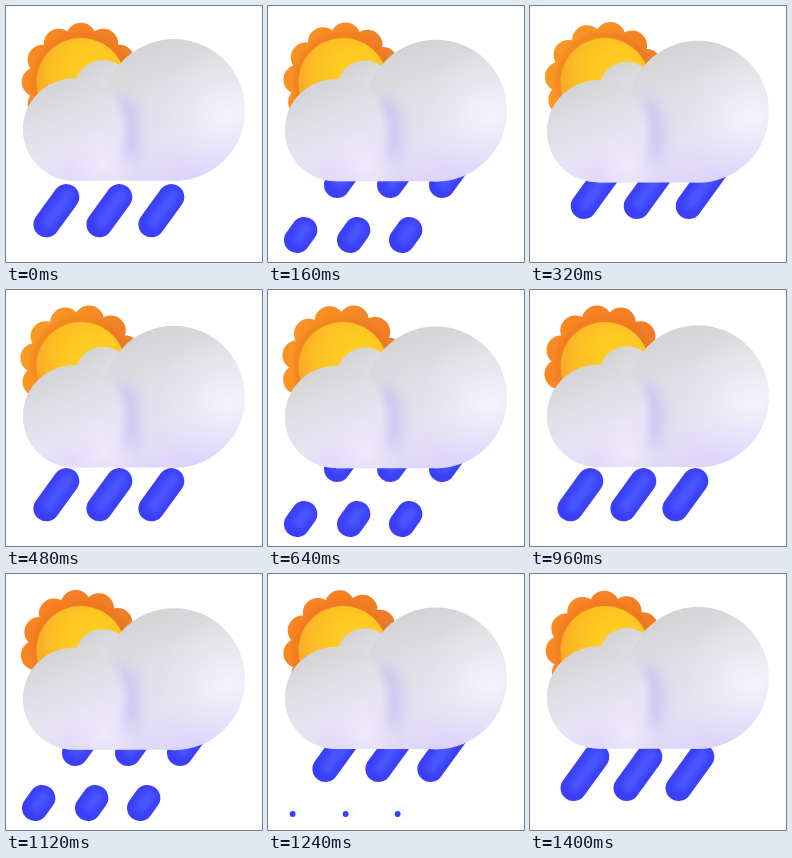
Animation, 256 px wide and 256 px high, one loop 1440 ms. Source, as an HTML page with a canvas:

```html
<!DOCTYPE html>
<html lang="en">
<head>
<meta charset="utf-8">
<title>Sun behind rain cloud</title>
<style>
  html, body { margin: 0; height: 100%; overflow: hidden; background: #fff; }
  canvas { display: block; width: 256px; height: 256px; }
</style>
</head>
<body>
<canvas id="stage" width="256" height="256"></canvas>
<script>
const LOOP = 1440, RAIN = 480, STEP = 40, TAU = Math.PI * 2;
const ctx = document.getElementById('stage').getContext('2d');

// Cosine wave over the loop, highest at the given time
const wave = (t, peak) => Math.cos(TAU * (t - peak) / LOOP);
const clamp = (v, lo, hi) => Math.min(hi, Math.max(lo, v));

function addCircle(path, x, y, r) {
  path.moveTo(x + r, y);
  path.arc(x, y, r, 0, TAU);
}

function disc(x, y, r, fill) {
  ctx.beginPath();
  ctx.arc(x, y, r, 0, TAU);
  ctx.fillStyle = fill;
  ctx.fill();
}

function withStops(gradient, colors) {
  colors.forEach((c, i) => gradient.addColorStop(i / (colors.length - 1), c));
  return gradient;
}
const radial = (x, y, r, ...colors) => withStops(ctx.createRadialGradient(x, y, 0, x, y, r), colors);
const linear = (x0, y0, x1, y1, ...colors) => withStops(ctx.createLinearGradient(x0, y0, x1, y1), colors);

function drawSun(t) {
  const x = 75, y = 76;
  const tip = 60.6 - 1.3 * wave(t, 0), bump = 15;
  const turn = TAU / 12 * t / LOOP;
  const light = 142 + 10 * wave(t, 440);
  const petals = new Path2D();
  addCircle(petals, x, y, 50);
  for (let i = 0; i < 12; i++) {
    const a = turn + i * TAU / 12;
    addCircle(petals, x + (tip - bump) * Math.sin(a), y - (tip - bump) * Math.cos(a), bump);
  }
  ctx.fillStyle = linear(x - 50, y - 10, x + 50, y - 10, `rgb(249,${light},36)`, `rgb(247,${light - 6},36)`, '#ee7d28');
  ctx.fill(petals);
  ctx.save();
  ctx.clip(petals);
  ctx.filter = 'blur(2px)';
  ctx.strokeStyle = 'rgba(226,104,24,.4)';
  ctx.lineWidth = 4;
  ctx.beginPath();
  ctx.arc(x, y, 47, 0, TAU);
  ctx.stroke();
  ctx.restore();
  disc(x, y + .5, 44.5, radial(88, 66, 64, '#ffd024', '#ffc922', '#fdbd24', '#f7a428'));
}

// Front and back ends travel at different speeds, so each drop stretches and then shrinks
function drawDrop(age, shift) {
  const s = age - 160;
  const front = Math.min(240, 179 + .1396 * s - 5.2e-5 * s * s);
  const back = clamp(191 + .206 * (age - RAIN), 150, front);
  const size = clamp((780 - age) / 90, 0, 1);
  if (!size) return;
  const xAt = y => 69 + shift - .727 * (y - 179);
  const line = (width, color, offset = 0) => {
    ctx.beginPath();
    ctx.moveTo(xAt(back) + offset, back - offset);
    ctx.lineTo(xAt(front) + offset, front - offset + .01);
    ctx.lineWidth = width * size;
    ctx.strokeStyle = color;
    ctx.stroke();
  };
  ctx.lineCap = 'round';
  line(26, '#3b3ff8');
  ctx.filter = 'blur(3px)';
  line(12, '#4a58ff', 2);
  ctx.filter = 'none';
}

function drawCloud(dy) {
  ctx.save();
  ctx.translate(0, dy);
  disc(97, 82, 28, linear(85, 55, 110, 95, '#d2d2d4', '#dddce0', '#e4e2e8'));

  const body = new Path2D();
  addCircle(body, 168, 104, 71);
  addCircle(body, 68, 123.5, 51);
  body.rect(68, 105, 100, 69.7);
  ctx.clip(body);
  ctx.fillStyle = linear(140, 33, 185, 175, '#d2d2d4', '#dfdee4', '#e6e2f2', '#dcd3fd');
  ctx.fillRect(0, 30, 256, 150);
  disc(222, 108, 70, radial(222, 108, 70, 'rgba(255,255,255,.6)', 'rgba(255,255,255,.25)', 'rgba(255,255,255,0)'));

  // Lavender shade where the lobes meet, under the soft-edged left lobe
  ctx.filter = 'blur(8px)';
  ctx.strokeStyle = 'rgba(196,189,246,.75)';
  ctx.lineWidth = 20;
  ctx.beginPath();
  ctx.moveTo(117, 100);
  ctx.quadraticCurveTo(128, 120, 122, 148);
  ctx.stroke();
  ctx.filter = 'blur(4px)';
  disc(66, 123.5, 53, linear(42, 75, 84, 174, '#d2d2d4', '#dfdee4', '#e8e4f4', '#dfd6fe'));
  ctx.filter = 'none';
  disc(98, 158, 34, radial(98, 158, 34, 'rgba(248,243,255,.6)', 'rgba(248,243,255,0)'));
  ctx.restore();
}

function frame(now) {
  const t = Math.floor(now % LOOP / STEP) * STEP;
  ctx.clearRect(0, 0, 256, 256);
  drawSun(t);
  for (const age of [t % RAIN, t % RAIN + RAIN])
    for (const shift of [0, 53, 105]) drawDrop(age, shift);
  drawCloud(1.75 - 1.75 * wave(t, -40));
  requestAnimationFrame(frame);
}
requestAnimationFrame(frame);
</script>
</body>
</html>
```
